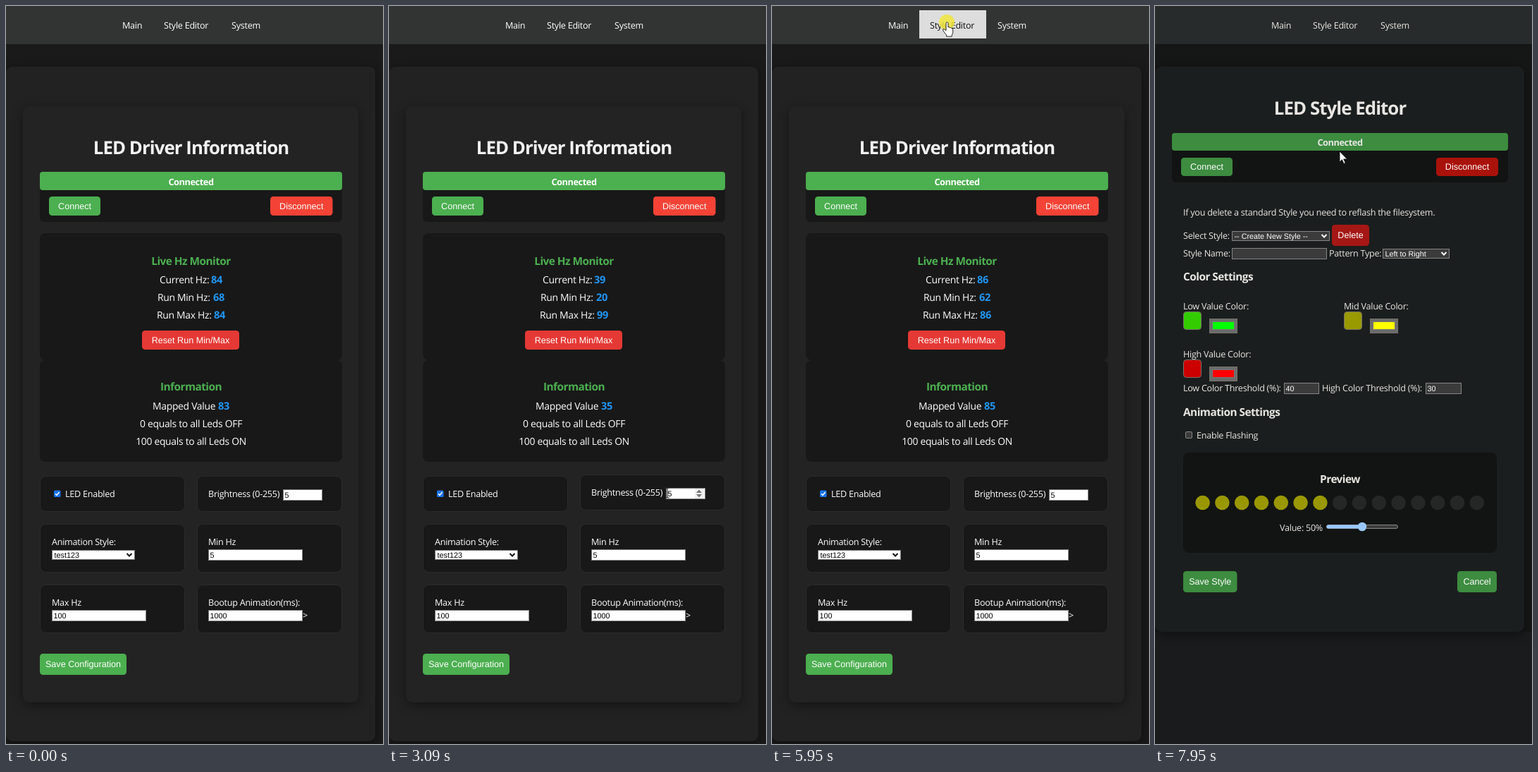
These frames come from a looping animation (535 by 1046 pixels, 8 s). An HTML page:

```html
<!DOCTYPE html>
<html lang="en">
<head>
<meta charset="utf-8">
<title>LED Driver</title>
<style>
html, body { margin: 0; width: 100%; height: 100%; overflow: hidden; background: #1a1a1a; }
svg { display: block; width: 100vw; height: 100vh; }
text { font: 12.6px "Open Sans", "Noto Sans", sans-serif; letter-spacing: -.021em; fill: #fff; text-rendering: geometricPrecision; white-space: pre; }
.mid { text-anchor: middle; }
.h1 { font-size: 25.8px; font-weight: 700; letter-spacing: -.036em; fill: #f2f2f2; }
.h3 { font-size: 15.4px; font-weight: 700; letter-spacing: -.035em; }
.bar { font-size: 12.8px; font-weight: 700; letter-spacing: -.035em; }
.big { font-size: 13.9px; }
.num { font-size: 14.6px; font-weight: 700; letter-spacing: -.03em; fill: #2196f3; }
.green { fill: #4caf50; }
.btn, .val { font-family: "Liberation Sans", Arial, sans-serif; letter-spacing: 0; }
.btn { font-size: 12.6px; }
.val { font-size: 10.8px; fill: #000; }
.shadow { filter: drop-shadow(0 4px 8px rgba(0, 0, 0, .4)); }
.panel { fill: #181818; }
.card > .panel { stroke: #2b2b2b; }
.field { fill: #fff; stroke: #767676; }
.edge { fill: none; stroke: #8c8c8c; }
.mark { fill: none; stroke-width: 2; }
#editor text { fill: #e8e6e3; }
#editor.bare text { fill: #f2f0ee; }
#editor .btn, #editor .val { fill: #fff; }
#editor .field { fill: #3b3b3b; stroke: #858585; }
#editor .edge { stroke: #858585; }
.swatch { stroke: #77736b; }
.well { fill: #6b6b6b; stroke: #77736b; }
.chip { stroke: #777; }
.bare .skin { display: none; }
.styled .raw { display: none; }
.bare .swatch, .bare .well, #editor.bare .field { fill: none; }
#editor.bare .input { stroke: none; }
.bare .low { transform: translateY(-20px); }
.bare .del { transform: translateX(-18px); }
</style>
</head>
<body>
<svg id="stage" viewBox="0 0 535 1046" preserveAspectRatio="none"></svg>
<script>
const LOOP = 8000, SWITCH = 6820, STYLED = 7090, RESET = 4220;

// Markup helpers
const text = (x, y, s, cls = '', id = '') => `<text x="${x}" y="${y}" class="${cls}"${id && ` id="${id}"`}>${s}</text>`;
const mid = (x, y, s, cls = '') => text(x, y, s, cls + ' mid');
const rect = (x, y, x2, y2, fill, r = 0, cls = '', id = '') =>
  `<rect x="${x}" y="${y}" width="${x2 - x}" height="${y2 - y}" rx="${r}" fill="${fill}" class="${cls}"${id && ` id="${id}"`}/>`;
const box = (x, y, x2, y2, cls, r = 0, fill = 'none') => rect(x + .5, y + .5, x2 - .5, y2 - .5, fill, r, cls);
const button = (x, y, x2, y2, fill, s, id = '') =>
  rect(x, y, x2, y2, fill, 4.5, 'skin', id) + mid((x + x2) / 2, (y + y2) / 2 + 4.4, s, 'btn');
const input = (x, y, x2, s = '') => box(x, y, x2, y + 16, 'field input')
  + `<path class="edge" d="M${x} ${y + 15.5}H${x2 - .5}V${y}"/>` + text(x + 2.5, y + 11.8, s, 'val');
const select = (x, y, x2, s, ink, cls = '') => `<g class="${cls}">` + box(x, y, x2, y + 14, 'field') + text(x + 3.5, y + 10.8, s, 'val')
  + `<path class="mark" stroke="${ink}" d="M${x2 - 11.5} ${y + 5}l3.5 3.5 3.5-3.5"/></g>`;
const nav = fill => rect(0, 0, 535, 54, fill, 0, 'skin') + text(165, 32, 'Main') + text(224, 32, 'Style Editor') + text(320, 32, 'System');

// Cards that lift while the pointer is over them
const cards = [
  [48, 666, 254, 717, rect(68, 686.5, 77.5, 696, '#1a73e8', 1.5)
    + '<path d="M70 691.4l2 2 3.6-4.4" fill="none" stroke="#fff" stroke-width="1.5"/>' + text(84, 696, 'LED Enabled')],
  [271, 666, 477, 717, text(287, 696, 'Brightness (0-255)') + input(393, 685, 449, '5')
    + '<g id="spin">' + rect(434, 686, 447, 700, '#efefef')
    + '<path fill="#777" d="M436 692l4-4.5 4 4.5zM436 694l4 4.5 4-4.5z"/></g>'],
  [48, 734, 254, 803, text(65, 764, 'Animation Style:') + select(65, 771, 183, 'test123', '#111')],
  [271, 734, 477, 803, text(287, 764, 'Min Hz') + input(287, 770, 421, '5')],
  [48, 820, 254, 889, text(65, 850, 'Max Hz') + input(65, 856, 199, '100')],
  [271, 820, 477, 889, text(287, 850, 'Bootup Animation(ms):') + input(287, 856, 421, '1000') + text(421, 868, '&gt;')]
];

const rows = [['Current Hz:', 218, 291, 393, 'now'], ['Run Min Hz:', 215, 294, 418, 'min'],
  ['Run Max Hz:', 214, 295, 443, 'max'], ['Mapped Value', 208, 301, 572, 'mapped']];

const mainPage = rect(0, 0, 535, 1046, '#1a1a1a') + rect(0, 86, 524, 1042, '#222', 9, 'shadow') + nav('#323433')
  + rect(24, 142, 500, 987, '#232323', 9, 'shadow')
  + mid(262.5, 210, 'LED Driver Information', 'h1')
  + rect(48, 235, 477, 306, '', 6, 'panel') + rect(48, 235, 477, 261, '#4caf50', 4) + mid(262.5, 254, 'Connected', 'bar')
  + button(61, 270, 134, 297, '#4caf50', 'Connect') + button(375, 270, 463.5, 297, '#f44336', 'Disconnect')
  + rect(48, 322, 477, 502, '', 8, 'panel') + rect(48, 502, 477, 646, '', 8, 'panel')
  + mid(262.5, 367, 'Live Hz Monitor', 'h3 green') + mid(262.5, 545, 'Information', 'h3 green')
  + rows.map(([s, x, nx, y, id]) => text(x, y, s, 'big') + text(nx, y, '', 'num', id)).join('')
  + button(193, 460, 331, 487, '#e53935', 'Reset Run Min/Max', 'reset')
  + mid(262.5, 596.5, '0 equals to all Leds OFF', 'big') + mid(262.5, 622, '100 equals to all Leds ON', 'big')
  + cards.map(([x, y, x2, y2, body]) => `<g class="card">${box(x, y, x2, y2, 'panel', 8)}${body}</g>`).join('')
  + button(48, 918, 171, 948, '#4caf50', 'Save Configuration');

const color = (x, y, s, swatch, fill) => text(x, y, s) + box(x, y + 3, x + 26, y + 29, 'swatch', 4, swatch)
  + box(x + 37, y + 13, x + 77, y + 34, 'well') + box(x + 41, y + 17, x + 73, y + 29, 'chip', 0, fill);
const leds = Array.from({ length: 15 }, (_, i) =>
  `<circle cx="${67.6 + i * 27.8}" cy="704" r="10.3" fill="${i < 7 ? '#9a9800' : '#252727'}"/>`).join('');

const editorPage = rect(0, 0, 535, 1046, '#1a1b1c') + rect(0, 54, 535, 887, '#151616', 0, 'skin')
  + rect(0, 86, 524, 866, '#1a1b1c', 9, 'raw shadow') + rect(0, 86, 524, 887, '#1b1e1e', 9, 'skin shadow')
  + nav('#272b2b') + mid(262.5, 154, 'LED Style Editor', 'h1')
  + rect(24, 180, 501, 250, '#121413', 6, 'skin') + rect(24, 180, 501, 205, '#3d8c40', 4, 'skin')
  + mid(262.5, 198, 'Connected', 'bar skin') + mid(262.5, 198, 'Disconnected', 'bar raw')
  + button(37, 215, 110, 241, '#3d8c40', 'Connect') + button(399, 215, 487, 241, '#a9120a', 'Disconnect')
  + text(40, 297, 'If you delete a standard Style you need to reflash the filesystem.')
  + text(40, 330, 'Select Style:')
  + select(109, 319, 248, '-- Create New Style --', '#fff', 'skin') + select(109, 319, 230, '-- Create New Style --', '#fff', 'raw')
  + `<g class="del">${button(251, 310, 304, 340, '#a51714', 'Delete')}</g>`
  + text(40, 355, 'Style Name:') + input(109, 343, 244) + text(247, 355, 'Pattern Type:') + select(323, 344, 418, 'Left to Right', '#fff')
  + text(40, 389, 'Color Settings', 'h3')
  + color(40, 430, 'Low Value Color:', '#33cc00', '#0f0') + color(268, 430, 'Mid Value Color:', '#999900', '#ff0')
  + color(40, 498, 'High Value Color:', '#cc0000', '#f00')
  + text(40, 546, 'Low Color Threshold (%):') + input(183, 534, 233, '40')
  + text(237, 546, 'High Color Threshold (%):') + input(384, 534, 435, '30')
  + text(40, 581, 'Animation Settings', 'h3')
  + box(43, 603, 53, 613, 'field', 1.5) + text(59, 613, 'Enable Flashing')
  + rect(40, 633, 485, 775, '#121413', 8, 'skin') + mid(262.5, 676, 'Preview', 'h3') + `<g class="skin">${leds}</g>`
  + '<g class="low">' + text(177, 744, 'Value: 50%') + box(243, 735, 345, 741, 'field', 2.5)
  + rect(243.5, 735.5, 294, 740.5, '#99c8ff', 2.5) + '<circle cx="294" cy="738" r="6.3" fill="#99c8ff"/>'
  + button(40, 801, 116.5, 831, '#3d8c40', 'Save Style') + button(429, 801, 485, 831, '#3d8c40', 'Cancel') + '</g>';

const pointer = `<g id="pointer">
  <path id="arrow" fill="#fff" stroke="#111" stroke-width=".8" d="M0 0V15L3.4 11.8 6 17.4 8.2 16.4 5.7 11H10.5Z"/>
  <path id="hand" fill="#fff" stroke="#111" stroke-width=".9" d="M-2 1.5a1.5 1.5 0 0 1 3 0V7l1-.3q1.2 0 1.5 1 1.8-.4 2.2.9 2-.2 2 1.6v4q0 2-1.5 4v2h-7.5v-2q-3-3-5.2-7-.3-2 2-1.4l2.5 2Z"/>
  <path id="beam" fill="none" stroke="#333" stroke-width="1.2" d="M-3-7h2.2l.8.8.8-.8H3M0-6V6M-3 7h2.2l.8-.8.8.8H3"/></g>`;

const $ = id => document.getElementById(id);
$('stage').innerHTML = `<g id="main">${mainPage}</g><g id="editor" class="bare">${editorPage}</g>
  <g id="navHover">${rect(209, 6, 304, 46, '#ddd', 0, '', 'navFill')}${text(224, 32, 'Style Editor', '', 'navText')}</g>
  <circle id="click" r="11" fill="#f0e63c" fill-opacity=".85"/>${pointer}`;
const cardNodes = [...document.querySelectorAll('.card')];

// Pointer moves: start, end, steps, x, y
const START = [371, 1021];
const moves = [
  [320, 520, 3, 361, 1004], [1120, 1660, 9, 216, 894], [1727, 1920, 4, 130, 795],
  [1990, 2520, 8, 165, 692], [2710, 3090, 6, 395, 690], [3490, 4080, 9, 293, 472],
  [4410, 4480, 2, 294, 476], [5010, 5750, 12, 249, 23], [6280, 6620, 5, 250, 28],
  [7090, 7880, 13, 260, 182], [7950, 7951, 1, 262, 206]
];
const clicks = [[4110, 4230], [5950, 6080]];
const readings = [[0, 84], [420, 93], [790, 99], [2060, 71], [2320, 44], [2520, 20], [2850, 39], [3290, 45],
  [3750, 54], [RESET, 62], [4810, 66], [5280, 77], [5680, 86], [6420, 91]];
const beams = [[393, 685, 449, 701], [287, 770, 421, 786], [65, 856, 199, 872], [287, 856, 421, 872]];
const NAV = [209, 6, 304, 46], RESET_BOX = [193, 460, 331, 487];

function pointerAt(t) {
  let [x, y] = START;
  for (const [t0, t1, n, tx, ty] of moves) {
    if (t < t0) break;
    const p = Math.min(1, Math.floor((t - t0) / (t1 - t0) * (n - 1) + 1.001) / n);
    x += (tx - x) * p;
    y += (ty - y) * p;
  }
  return [x, y];
}

function valuesAt(t) {
  let now = 84, min = 68, max = 84;
  for (const [at, hz] of readings) {
    if (t < at) break;
    now = hz;
    min = at === RESET ? hz : Math.min(min, hz);
    max = at === RESET ? hz : Math.max(max, hz);
  }
  return { now, min, max, mapped: Math.floor((now - 5) * 100 / 95) };
}

const show = (id, on) => { $(id).style.display = on ? '' : 'none'; };

function draw(t) {
  const [x, y] = pointerAt(t), visible = t >= 320, onMain = t < SWITCH;
  const over = ([l, top, r, b]) => visible && x >= l && x <= r && y >= top && y <= b;
  const onNav = over(NAV), onReset = onMain && over(RESET_BOX);

  show('main', onMain);
  show('editor', !onMain);
  $('editor').setAttribute('class', t < STYLED ? 'bare' : 'styled');

  const values = valuesAt(t);
  for (const id in values) $(id).textContent = values[id];
  cardNodes.forEach((node, i) => node.setAttribute('transform', `translate(0 ${over(cards[i]) ? -2 : 0})`));
  $('reset').setAttribute('fill', onReset ? '#b71c1c' : '#e53935');
  show('spin', over(beams[0]));

  const fade = onMain ? Math.min(1, Math.max(0, (6620 - t) / 340)) : +(t >= STYLED);
  show('navHover', onNav && fade > 0);
  $('navHover').style.opacity = fade;
  $('navFill').setAttribute('fill', onMain ? '#ddd' : '#353a3b');
  $('navText').style.fill = onMain ? '#111' : '#e8e6e3';

  const kind = onNav || onReset ? 'hand' : onMain && beams.some(over) ? 'beam' : 'arrow';
  for (const id of ['arrow', 'hand', 'beam']) show(id, id === kind);
  show('pointer', visible);
  $('pointer').setAttribute('transform', `translate(${x} ${y})`);
  show('click', clicks.some(([a, b]) => t >= a && t < b));
  $('click').setAttribute('cx', x - 1);
  $('click').setAttribute('cy', y);
}

const begin = performance.now();
function tick() {
  draw((performance.now() - begin) % LOOP);
  requestAnimationFrame(tick);
}
tick();
</script>
</body>
</html>
```
